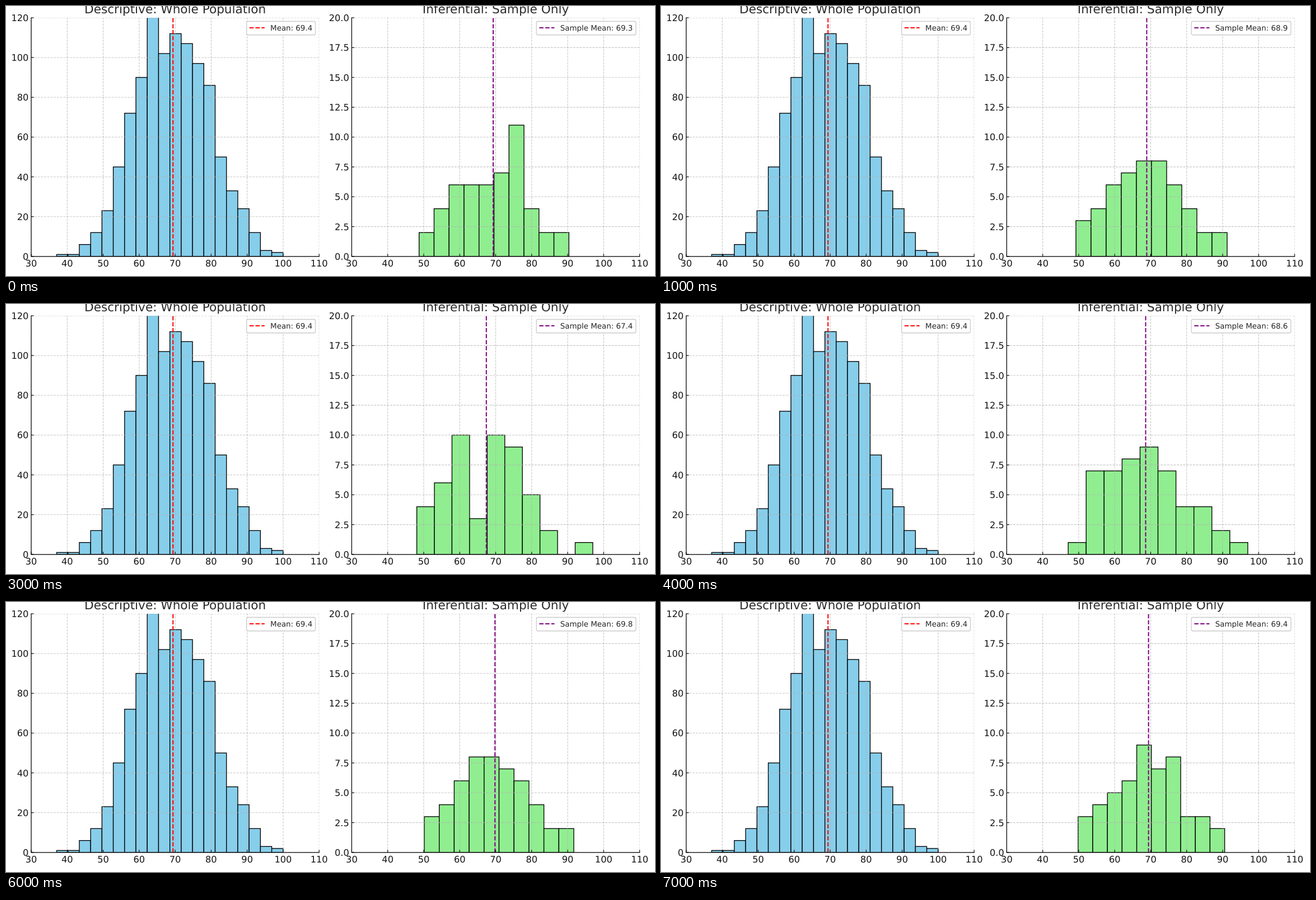
An HTML page for the animation above (8000 ms loop, 1159x483 px).

```html
<!DOCTYPE html>
<html lang="en">
<head>
<meta charset="utf-8">
<title>Descriptive and inferential statistics</title>
<style>
  html, body { margin: 0; width: 100%; height: 100%; overflow: hidden; background: #fff; }
  svg { display: block; }
  text { font-family: "DejaVu Sans", sans-serif; font-size: 16.2px; fill: #141414; text-rendering: geometricPrecision; }
  .title { font-size: 21.6px; fill: #2b2b2b; }
  .legend { font-size: 13.4px; fill: #262626; }
  .bars { stroke: #000; stroke-width: 1.35; }
  .grid { stroke: #b0b0b0; stroke-opacity: .7; stroke-width: 1.08; stroke-dasharray: 4 1.73; }
  .axis { stroke: #000; stroke-width: 1.25; fill: none; stroke-linecap: square; }
  .tick { stroke: #000; stroke-width: 1.08; }
  .mean { stroke-width: 2.03; stroke-dasharray: 7.5 3.24; }
  .box { fill: #fff; fill-opacity: .8; stroke: #ccc; stroke-width: 1.35; }
</style>
</head>
<body>
<svg id="stage" width="1159" height="483" viewBox="0 0 1159 483"></svg>
<script>
const TOP = 21, BASE = 448, WIDTH = 514.2, STEP = 1000;
const stage = document.getElementById('stage');

function add(parent, tag, attrs, text) {
  const node = document.createElementNS('http://www.w3.org/2000/svg', tag);
  for (const key in attrs) node.setAttribute(key, attrs[key]);
  if (text !== undefined) node.textContent = text;
  parent.appendChild(node);
  return node;
}

const line = (parent, cls, x1, y1, x2, y2, more) =>
  add(parent, 'line', { class: cls, x1, y1, x2, y2, ...more });

function makeChart({ id, x0, max, tick, digits, title, fill, color, label, boxLeft }) {
  const px = v => x0 + (v - 30) * WIDTH / 80;
  const py = n => BASE - n * (BASE - TOP) / max;
  const right = x0 + WIDTH;

  const clip = add(stage, 'clipPath', { id });
  add(clip, 'rect', { x: x0, y: TOP, width: WIDTH, height: BASE - TOP });
  const plot = add(stage, 'g', { 'clip-path': `url(#${id})` });
  const bars = add(plot, 'g', { class: 'bars', fill });
  const ticks = add(stage, 'g', {});

  for (let v = 30; v <= 110; v += 10) {
    line(plot, 'grid', px(v), BASE, px(v), TOP);
    line(ticks, 'tick', px(v), BASE, px(v), BASE - 4.7);
    add(stage, 'text', { x: px(v), y: 465.8, 'text-anchor': 'middle' }, v);
  }
  for (let n = 0; n <= max; n += tick) {
    line(plot, 'grid', x0, py(n), right, py(n));
    line(ticks, 'tick', x0, py(n), x0 + 4.7, py(n));
    add(stage, 'text', { x: x0 - 4.7, y: py(n) + 5.9, 'text-anchor': 'end' }, n.toFixed(digits));
  }

  const mean = line(plot, 'mean', 0, BASE, 0, TOP, { stroke: color });
  add(stage, 'path', { class: 'axis', d: `M${x0} ${TOP}V${BASE}H${right}` });
  add(stage, 'text', { class: 'title', x: x0 + WIDTH / 2, y: 12.9, 'text-anchor': 'middle' }, title);

  add(stage, 'rect', { class: 'box', x: boxLeft, y: 27.5, width: right - 6.7 - boxLeft, height: 24.2, rx: 2.7 });
  line(stage, 'mean', boxLeft + 5.2, 39, boxLeft + 32.2, 39, { stroke: color });
  const caption = add(stage, 'text', { class: 'legend', x: boxLeft + 42.5, y: 43.8 });

  return ({ from, to, avg, counts }) => {
    const w = (to - from) / counts.length;
    bars.replaceChildren();
    counts.forEach((n, i) => add(bars, 'rect', {
      x: from + i * w, y: py(n) - (n ? 0 : .01), width: w, height: BASE - py(n) + (n ? 0 : .01)
    }));
    mean.setAttribute('x1', px(avg));
    mean.setAttribute('x2', px(avg));
    caption.textContent = `${label}: ${avg.toFixed(1)}`;
  };
}

const showPopulation = makeChart({
  id: 'left', x0: 45, max: 120, tick: 20, digits: 0, title: 'Descriptive: Whole Population',
  fill: '#87ceeb', color: '#ff0000', label: 'Mean', boxLeft: 429.6
});
const showSample = makeChart({
  id: 'right', x0: 617.4, max: 20, tick: 2.5, digits: 1, title: 'Inferential: Sample Only',
  fill: '#90ee90', color: '#800080', label: 'Sample Mean', boxLeft: 947.2
});

showPopulation({
  from: 90.5, to: 494.8, avg: 69.4,
  counts: [1, 1, 6, 12, 23, 45, 72, 90, 122, 102, 112, 107, 97, 86, 50, 33, 24, 12, 3, 2]
});

// Bin range in pixels, sample mean, bin counts
const samples = [
  [737.7, 1005.3, 69.3, [2, 4, 6, 6, 6, 7, 11, 4, 2, 2]],
  [741, 1011, 68.9, [3, 4, 6, 7, 8, 8, 6, 4, 2, 2]],
  [724.6, 1009.5, 67.9, [4, 5, 2, 6, 5, 11, 11, 3, 1, 2]],
  [733.6, 1047.9, 67.4, [4, 6, 10, 3, 10, 9, 5, 2, 0, 1]],
  [727.2, 1047.9, 68.6, [1, 7, 7, 8, 9, 7, 4, 4, 2, 1]],
  [737.7, 1004.5, 71.3, [1, 1, 2, 10, 11, 6, 6, 7, 2, 4]],
  [747, 1014, 69.8, [3, 4, 6, 8, 8, 7, 6, 4, 2, 2]],
  [744.9, 1006.6, 69.4, [3, 4, 5, 6, 9, 7, 8, 3, 3, 2]]
].map(([from, to, avg, counts]) => ({ from, to, avg, counts }));

const start = performance.now();
let shown = -1;
function draw(now) {
  const i = Math.floor(Math.max(0, now - start) / STEP) % samples.length;
  if (i !== shown) showSample(samples[shown = i]);
  requestAnimationFrame(draw);
}
draw(start);
</script>
</body>
</html>
```
